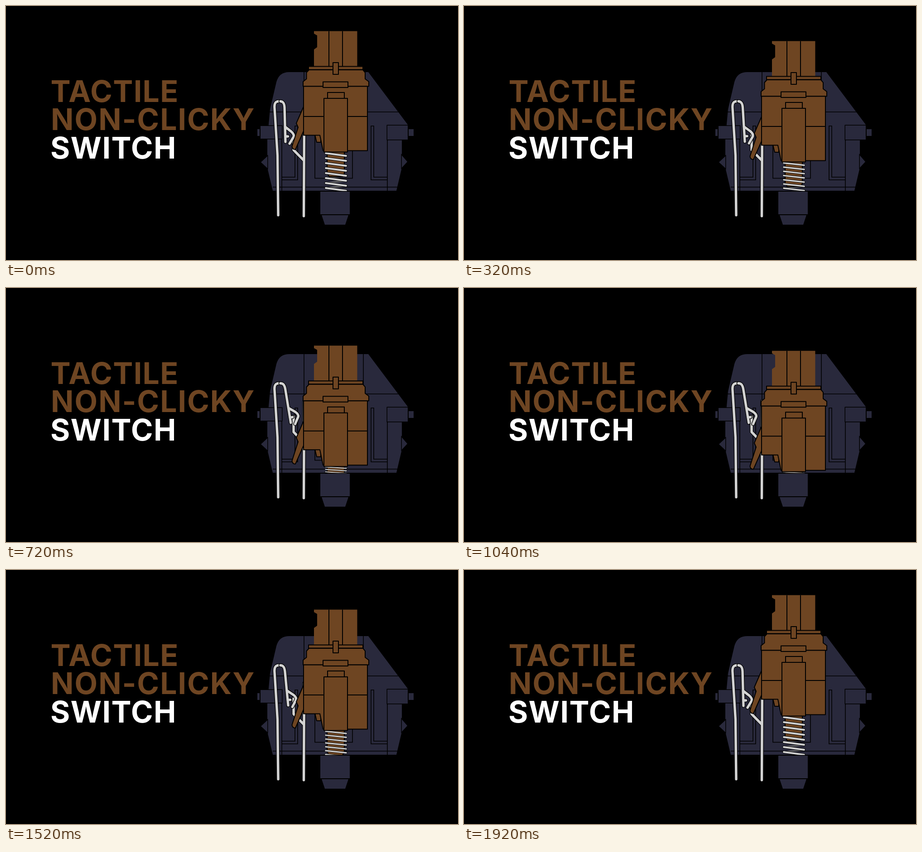
An HTML page for the animation above (2160 ms loop, 998 by 561 pixels).

```html
<!DOCTYPE html>
<html lang="en">
<head>
<meta charset="utf-8">
<title>Tactile non-clicky switch</title>
<style>
  html, body { margin: 0; width: 100%; height: 100%; overflow: hidden; background: #000; }
  svg { display: block; width: 998px; height: 561px; }
  text { font: 700 66px Inter, Lato, sans-serif; letter-spacing: 1.4px; }
  .wide { letter-spacing: 2px; }
  .case { fill: #29293c; stroke: #000; stroke-width: 3; paint-order: stroke; }
  .line { fill: none; stroke: #000; stroke-width: 1.6; }
  .brown { fill: #6e4522; }
  .part { fill: #6e4522; stroke: #000; stroke-width: 2; stroke-linejoin: round; }
  .edge, .metal { fill: none; stroke-linecap: round; stroke-linejoin: round; }
  .edge { stroke: #000; stroke-width: 8; }
  .metal { stroke: #d3d3d3; stroke-width: 5.4; }
  .coil.edge { stroke-width: 6; }
  .coil.metal { stroke-width: 3.8; }
  .coil.back { fill: none; stroke: #686868; stroke-width: 3; }
</style>
</head>
<body>
<svg viewBox="0 0 998 561">
  <defs>
    <clipPath id="well"><path d="M690 150H770V408.500H690Z"/></clipPath>
    <path id="post" d="M601 462L599.500 330L593 226C592 215 595 210.500 603 210.500"/>
    <g id="arm">
      <path d="M606 210.500C612 211 614.500 215 615 224L617 300"/>
      <path d="M616.500 267L630 277.500Q637 284 635 289L626 304"/>
      <path d="M617 288H622.500"/>
    </g>
    <path id="contact" d="M658.500 250L657.500 464M635 284V318L657.500 341"/>
  </defs>

  <text x="98.500" y="212" class="brown">TACTILE</text>
  <text x="99" y="274" class="brown wide">NON-CLICKY</text>
  <text x="98" y="337" fill="#fff">SWITCH</text>

  <g class="case">
    <path d="M577 293L583 228L597 168Q603 146 625 146H800L887 262L874 295V357L862 408H589L577 357Z"/>
    <path d="M577 332L563 345L577 358ZM874 330L886 344L874 357Z"/>
    <path d="M562 265H609V293H562ZM842 264H887V295H842Z"/>
    <path d="M555 272H560V287H555ZM889 272H900V287H889Z"/>
    <path d="M694 410H759V460H694ZM697 462H756L749 483H704Z"/>
  </g>
  <path class="line" d="M582 234H867M658 146V400M789 146V265M609 293V408M842 295V408M609 400H842
    M589 400H609M842 400H864M682 265V380.500H765V265
    M609 378H638V265H644V384H609M842 378H812V265H806V384H842"/>

  <g clip-path="url(#well)">
    <g class="spring"><path class="coil back"/></g>
    <path class="part moving" d="M709 300H747V370L743 377H714L709 370Z"/>
    <g class="spring"><path class="coil edge"/><path class="coil metal"/></g>
  </g>

  <use href="#contact" class="edge"/><use href="#contact" class="metal"/>
  <use href="#post" class="edge"/><use href="#post" class="metal"/>
  <g id="lever"><use href="#arm" class="edge"/><use href="#arm" class="metal"/></g>

  <g class="part moving">
    <path d="M658 220L641 259L645 268L631.500 310Q632 317 639 317L658 274Z"/>
    <path d="M682 284L686 301H695V284Z"/>
    <path stroke="none" d="M680 55.500H775.500V134H680V96L687 91V65L680 61Z"/>
    <path d="M713 55.500V134M743 55.500V134"/>
    <path d="M668 133.500H788V140.500H668Z"/>
    <path d="M669 141H788L793 147V161L801 167V177.500H656V167L663.500 161V147Z"/>
    <path d="M657 177.500H798V319.500H700L693 285.500H657Z"/>
    <path d="M657 244H798"/>
    <path d="M700 167.500H755V180H700ZM722 125H734V151H722Z"/>
    <path d="M710 191H747V204H710ZM702 204H754V322.500H702Z"/>
  </g>
</svg>
<script>
const LOOP = 2160, STEP = 80, PRESS = 960, TRAVEL = 85;
const COILS = 13, PITCH = 11, SEAT = 322;

// Lever angle against stem travel: the leg's bump holds it back, then lets go.
const LEVER = [[0, 0], [13, 3.7], [22, 2], [27, 1.6], [40, 7.8], [TRAVEL, 7.8]];

const all = q => document.querySelectorAll(q);
const lever = document.getElementById('lever');
const moving = all('.moving'), springs = all('.spring');

function coils(x1, y1, x2, y2) {
  let d = '';
  for (let k = 0; k < COILS; k++) {
    const y = k * PITCH;
    d += `M${x1} ${y + y1}L${x2} ${y + y2}`;
  }
  return d;
}

function lerpTable(table, x) {
  const i = Math.max(1, table.findIndex(p => p[0] >= x));
  const [x0, y0] = table[i - 1], [x1, y1] = table[i];
  return y0 + (y1 - y0) * (x - x0) / (x1 - x0);
}

function travel(ms) {
  const u = Math.max(0, 1 - Math.abs(ms - PRESS) / PRESS);
  return TRAVEL * u * u * (3 - 2 * u);
}

// The spring hangs from the stem and is squeezed against the foot of the tube.
function draw(ms) {
  const d = travel(Math.floor(ms / STEP) * STEP);
  const squeeze = 1 - d / (COILS * PITCH);
  moving.forEach(e => e.setAttribute('transform', `translate(0 ${d})`));
  springs.forEach(e => e.setAttribute('transform', `translate(0 ${SEAT + d}) scale(1 ${squeeze})`));
  lever.setAttribute('transform', `rotate(${-lerpTable(LEVER, d)} 606 212)`);
}

all('.coil').forEach(e => e.setAttribute('d',
  e.classList.contains('back') ? coils(751, 9, 706, 14) : coils(706, 3, 751, 9)));

const start = performance.now();
function tick() {
  draw((performance.now() - start) % LOOP);
  requestAnimationFrame(tick);
}
tick();
</script>
</body>
</html>
```
